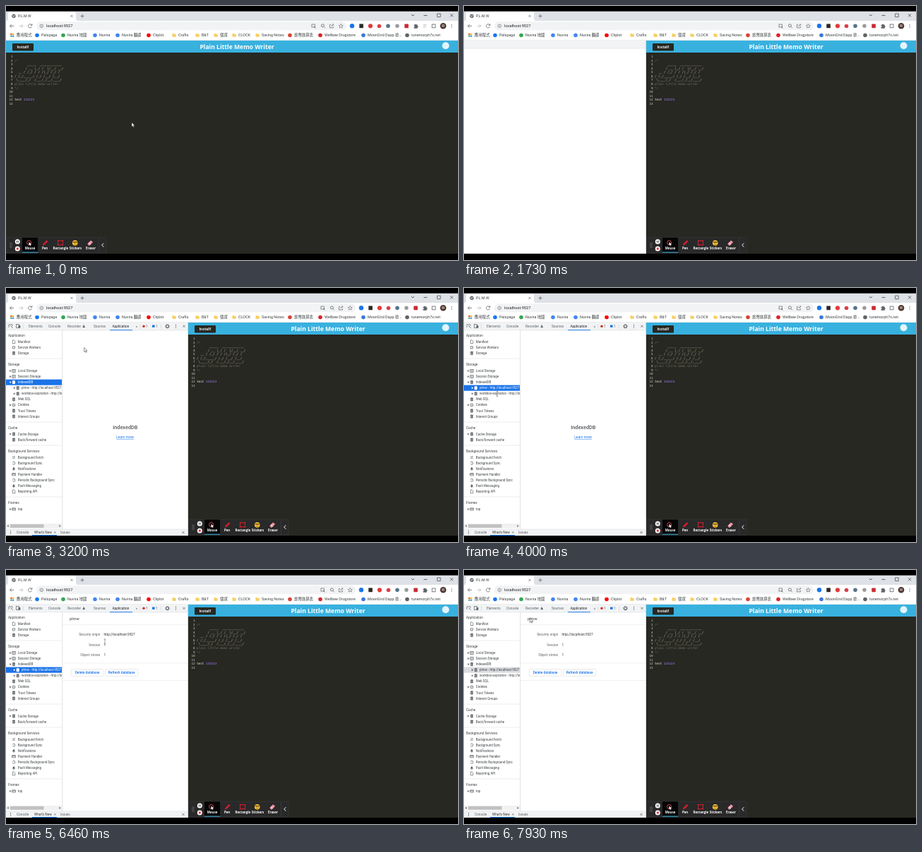
An HTML page for the animation above (8000 ms loop, 640 px wide and 360 px high).

```html
<!DOCTYPE html>
<html lang="en">
<head>
<meta charset="utf-8">
<title>Text editor and storage panel</title>
<style>
html, body { margin: 0; width: 100%; height: 100%; overflow: hidden; background: #000; }
svg { display: block; width: 100%; height: 100%; }
text { font-family: Roboto, "Noto Sans CJK TC", "Noto Sans CJK", sans-serif; white-space: pre; }
.code text { font-family: "DejaVu Sans Mono", monospace; font-size: 4.28px; }
.code .art { stroke: #75715e; stroke-width: .25px; }
.wide text, #title { font-family: "Open Sans", sans-serif; }
</style>
</head>
<body>
<svg id="stage" viewBox="0 0 640 360" preserveAspectRatio="none"></svg>
<script>
const LOOP = 8000, PANE = 258;
const INK = '#3c4043', GREY = '#5f6368', BLUE = '#1a73e8', RED = '#d5202f';

const rect = (x, y, w, h, fill, more = '') =>
  `<rect x="${x}" y="${y}" width="${w}" height="${h}" fill="${fill}" ${more}/>`;
const circle = (x, y, r, fill, more = '') =>
  `<circle cx="${x}" cy="${y}" r="${r}" fill="${fill}" ${more}/>`;
const line = (d, color = GREY, w = 0.8, more = '') =>
  `<path d="${d}" fill="none" stroke="${color}" stroke-width="${w}" ${more}/>`;
// y is the middle of the lower-case row
const text = (x, y, s, size = 5, fill = INK, more = '') =>
  `<text x="${x}" y="${y + size * 0.36}" font-size="${size}" fill="${fill}" ${more}>${s}</text>`;
const group = (id, body, more = '') => `<g id="${id}" ${more}>${body}</g>`;
const mid = 'text-anchor="middle"', end = 'text-anchor="end"', bold = 'font-weight="700"';
const cross = (x, y, r, c = GREY, w = 0.7) =>
  line(`M${x - r} ${y - r}l${2 * r} ${2 * r}m0 ${-2 * r}l${-2 * r} ${2 * r}`, c, w);
const dots = (x, y, c = GREY) => [-2, 0, 2].map(d => circle(x, y + d, 0.6, c)).join('');
const globe = (x, y) => circle(x, y, 2.7, GREY) +
  line(`M${x - 2} ${y - 1}q2 2 4 0M${x - 1} ${y + 2}q0 -2 2 -2`, '#fff', 0.6);

function browser() {
  const folder = x => `<path d="M${x - 2.5} 39h2l.8 .8h2.4v4h-5.2z" fill="#f6cf62"/>`;
  const marks = [
    [50, 'Palspage', '#1877f2'], [87, 'Nuvira 地圖', '#34a853'], [132, 'Nuvira', '#4285f4'],
    [164, 'Nuvira 翻譯', '#4285f4'], [208, 'Cliplot', '#f00'], [244, 'Crafts'], [277, 'B&amp;T'],
    [303, '個資'], [329, 'CLOCK'], [362, 'Saving Notes'], [408, '旅幣換算表', '#d64535'],
    [451, 'Wellbee Drugstore', '#d8232a'], [512, 'MoonGrid Dapp 排...', '#3a78d8'],
    [574, 'tunemorph7x.net', GREY]
  ];
  let apps = '';
  ['#ea4335', '#fbbc04', '#34a853', '#4285f4'].forEach((c, i) =>
    apps += rect(6.3 + i % 2 * 2.8, 38.8 + (i >> 1) * 2.8, 2.2, 2.2, c));
  return rect(0, 0, 640, 21, '#dee1e6') +
    '<path d="M0 21q3 0 3-3V11q0-3 3-3H96q3 0 3 3v7q0 3 3 3z" fill="#fff"/>' +
    globe(11, 14.3) + text(17, 14.5, 'P.L.M.W', 5.2) + cross(93, 14.3, 1.5) +
    line('M105.5 14.3h5M108 11.8v5') +
    line('M574 12l2 2 2-2M591.5 13.4h5', INK) +
    rect(610.7, 11, 4.4, 4.4, 'none', `stroke="${INK}" stroke-width=".7"`) + cross(631, 13.3, 2.1, INK) +
    rect(0, 21, 640, 28, '#fff') +
    line('M11 28.3H5.5M8 25.8l-2.5 2.5 2.5 2.5') +
    line('M18.5 28.3H24M21.5 25.8l2.5 2.5-2.5 2.5', '#b5b8bc') +
    line('M36.4 27a2.6 2.6 0 1 0 .1 2.4M36.9 25.2v2.1h-2.1') +
    `<rect id="pill" x="43" y="22.3" height="12" rx="6" fill="#f1f3f4"/>` +
    circle(50.3, 28.3, 2.3, 'none', `stroke="${GREY}" stroke-width=".6"`) +
    line('M50.3 28v1.6M50.3 26.8v.6', GREY, 0.6) +
    text(57, 28.2, 'localhost:9527', 5.7, '#202124') +
    group('tools', tools()) +
    group('list', line('M590.7 26.5h4.6M590.7 28.5h4.6M590.7 30.5h3', '#b9bcc0')) +
    rect(603.2, 26, 4.8, 4.8, 'none', `stroke="${GREY}" stroke-width=".8"`) +
    circle(619, 28.3, 4.3, '#4e342e') + text(619, 28.4, 'W', 5, '#fff', mid) + dots(631, 28.3) +
    apps + text(15, 41.5, '應用程式', 5.4) +
    marks.map(([x, s, c]) => (c ? circle(x - 6, 41.5, 2.8, c) : folder(x - 6)) +
      text(x, 41.5, s, 5.4)).join('') +
    rect(0, 48, 640, 0.7, '#e4e6e9');
}

function tools() {
  return rect(433, 26, 4.5, 4, 'none', `stroke="${GREY}" stroke-width=".7"`) + line('M436 29l2.4 2.4', GREY, 1) +
    circle(448.4, 27.8, 2, 'none', `stroke="${GREY}" stroke-width=".8"`) + line('M450 29.4l1.8 1.8') +
    line('M460 26.4h-1.6v4.5h5v-2M460.8 29q.2-2.6 3-2.6M462.6 25l1.4 1.4-1.4 1.4', GREY, 0.7) +
    line('M474.3 25.3l.9 2 2.1.2-1.6 1.4.5 2.1-1.9-1.1-1.9 1.1.5-2.1-1.6-1.4 2.1-.2z', GREY, 0.6) +
    circle(490, 28.3, 3.2, '#1976e8') + rect(500.3, 25.4, 5.6, 5.8, '#2b2926') +
    circle(516, 28.3, 3.1, '#e33a3a') + circle(528.5, 28.5, 2.8, '#db3f49') +
    circle(541, 28.3, 2.8, '#56748b') + circle(554, 28.3, 2.7, '#9a9a9a') +
    rect(564.3, 25.4, 5.6, 5.8, '#c92b34', 'rx=".8"') +
    '<path d="M577.6 26.6h1.6a1 1 0 0 1 2 0h1.5v1.6a1 1 0 0 1 0 2v1.5h-5.1v-1.6a1 1 0 0 0 0-2z" fill="#5f6368"/>';
}

function editor() {
  const art = [
    '       _____  ____________', '      / __ |_/ /  |/__/ __/', '  __ / /_/ / / /|_/ /_/ /',
    '/ /_/_____/ /_/ /__/ /__/', String.raw` \____/_/  /___/_/__/____/`
  ];
  const rows = ['', '/*', ...art, 'plain little memo writer', '*/', '', '', '', ''];
  const code = rows.map((s, i) => {
    const y = 71.4 + i * 5.58;
    return text(9.6, y, i + 1, 4.28, '#d0d0ca', end) +
      text(12, y, s, 4.28, '#75715e', art.includes(s) ? 'class="art"' : '');
  }).join('') +
    text(12, 71.4 + 11 * 5.58, 'test <tspan fill="#ae81ff">123123</tspan>', 4.28, '#f8f8f2');
  return rect(0, 66, 640, 294, '#272822') + rect(0, 48.7, 640, 17.3, '#38b1df') +
    rect(9, 53, 30, 10.5, '#272822', 'rx="1.2"') + text(24, 58.2, 'Install!', 5.7, '#fff', mid + ' font-weight="500"') +
    group('code', code, 'class="code"') + recorder();
}

function recorder() {
  const label = (x, s) => text(x, 343.8, s, 4.4, '#fff', mid + ' ' + bold);
  let grip = '';
  for (let i = 0; i < 8; i++) grip += circle(6 + i % 2 * 2, 336 + (i >> 1) * 2, 0.5, '#aaa');
  const labels = label(34, 'Mouse') + label(55, 'Pen') + label(77.3, 'Rectangle') +
    label(98.5, 'Stickers') + label(120, 'Eraser');
  return rect(0, 328, 142, 22, '#292929', 'stroke="#3b3b3b" stroke-width=".6"') + grip +
    circle(16.3, 334, 3.5, '#fff') + line('M15.3 332.5v3M17.3 332.5v3', '#222', 0.9) +
    circle(16.3, 344, 3.5, '#fff') + rect(14.8, 342.5, 3, 3, '#e53945') +
    rect(23, 328.3, 22, 21.4, '#050505') + rect(23, 348.6, 22, 1.1, '#3bb0dc') +
    circle(32.6, 335.4, 3, 'none', 'stroke="#e5525c" stroke-width=".9"') +
    '<path d="M32.5 334.5v5l1.2-1.1 1 1.7.8-.5-1-1.6h1.6z" fill="#fff"/>' +
    line('M52.3 339.2l1.2-2.8 4.3-4 1.2 1.2-4.2 4.3z', RED, 1) + line('M53.3 338l5-5', RED, 1.6) +
    rect(73.6, 332.6, 6.8, 6, 'none', `stroke="${RED}" stroke-width="1"`) +
    [[73.6, 332.6], [80.4, 332.6], [73.6, 338.6], [80.4, 338.6]].map(p => circle(...p, 0.9, RED)).join('') +
    circle(97.7, 335.7, 3.8, '#fbc537') + rect(94.8, 334, 5.8, 1.3, '#4c3b20') + line('M96 337q1.8 1.6 3.5 0', '#7a4a14', 0.7) +
    '<path d="M115.3 337l4.8-4.8 3 2.6-4.8 4.8h-1.2z" fill="#f495a5"/>' + line('M117 335.4l3 2.7', '#fff', 0.8) +
    group('labels', labels, 'class="wide"') +
    line('M131.5 328.5v21', '#444', 0.5) + line('M138.3 336.2l-2.6 2.7 2.6 2.7', '#fff', 1);
}

function devtools() {
  const tabs = [[32, 'Elements'], [60, 'Console'], [87, 'Recorder'], [124, 'Sources']];
  const tab = ([x, s]) => text(x, 54.2, s, 4.75, GREY);
  const strip = tabs.map(tab).join('') +
    '<path d="M109.5 52.6h1.4v1.2l1.3 2.3h-4l1.3-2.3z" fill="#5f6368"/>' +
    line('M4 55.8V51.8h5v2', GREY, 0.7) + line('M6.5 53.5l3.2 3.2', GREY, 0.9) +
    rect(14.5, 51.5, 4, 5, 'none', `stroke="${GREY}" stroke-width=".7"`) + rect(17.5, 53, 2.8, 3.8, GREY) +
    line('M24.5 51v6.5', '#cacdd1', 0.5) +
    circle(228.5, 54.2, 2, 'none', `stroke="${GREY}" stroke-width="1.1"`) +
    circle(228.5, 54.2, 2.8, 'none', `stroke="${GREY}" stroke-width=".7" stroke-dasharray="1.1 1.1"`) +
    dots(240.5, 54.2) + cross(252, 54.2, 1.6);
  const drawer = rect(0, 342, PANE, 9, '#f1f3f4') + line(`M0 342h${PANE}`, '#d4d6da', 0.5) +
    dots(6.5, 346.4) + text(15, 346.4, 'Console', 4.75, GREY) + text(40, 346.4, "What's New", 4.75, '#333') +
    cross(69.3, 346.4, 1.2) + text(77, 346.4, 'Issues', 4.75, GREY) +
    rect(37, 350, 35, 1, BLUE) + cross(251, 346.4, 1.6);
  return rect(0, 48.7, PANE, 312, '#fff') +
    rect(0, 48.7, PANE, 11.3, '#f1f3f4') + line(`M0 60h${PANE}`, '#d4d6da', 0.5) +
    group('strip', strip) +
    group('oldTabs', tab([150, 'Network']) + tab([178, 'Performance']) + rect(237, 59, 20.5, 1, BLUE)) +
    group('app', appTab() + sidebar() + emptyView() + dbView()) +
    group('drawer', drawer) + rect(PANE - 0.7, 49, 0.7, 311, '#cfd2d6');
}

function appTab() {
  return text(150.5, 54.2, 'Application', 4.75, '#202124') + rect(147, 59.2, 32, 0.9, BLUE) +
    text(185, 54, '»', 6, GREY, mid) + line('M190 51.5v6M219.5 51.5v6', '#cacdd1', 0.5) +
    circle(195, 54.2, 1.8, '#d93025') + text(198, 54.2, '1', 4.7, GREY) +
    rect(207, 52.5, 3.6, 3.2, BLUE, 'rx=".5"') + text(212, 54.2, '1', 4.7, GREY);
}

const arrow = (x, y, open) =>
  `<path d="${open ? `M${x - 1.6} ${y - 0.9}h3.2l-1.6 2.3z` : `M${x - 1} ${y - 1.6}v3.2l2.2-1.6z`}" fill="${GREY}"/>`;
const icons = {
  db: (x, y) => `<path d="M${x - 2} ${y - 2}q2-1.2 4 0v4q-2 1.2-4 0z" fill="${GREY}"/>` +
    line(`M${x - 2} ${y - 0.8}q2 1 4 0m-4 1.6q2 1 4 0`, '#fff', 0.4),
  page: (x, y) => line(`M${x - 1.7} ${y - 2.3}h2.2l1.3 1.3v3.4h-3.5z`, GREY, 0.7),
  gear: (x, y) => circle(x, y, 1.7, 'none', `stroke="${GREY}" stroke-width="1.2" stroke-dasharray="1.1 .5"`),
  grid: (x, y) => rect(x - 2.2, y - 1.9, 4.4, 3.8, 'none', `stroke="${GREY}" stroke-width=".7"`) +
    line(`M${x - 2} ${y - 0.5}h4M${x} ${y - 0.5}v2.3`, GREY, 0.6),
  swap: (x, y) => line(`M${x - 2} ${y - 1}h3.6m-1-1l1 1M${x + 2} ${y + 1}h-3.6m1 1l-1-1`, GREY, 0.7),
  sync: (x, y) => circle(x, y, 1.9, 'none', `stroke="${GREY}" stroke-width=".8" stroke-dasharray="4.5 1.5"`),
  bell: (x, y) => `<path d="M${x - 2} ${y + 1.4}l.6-1v-1q1.4-3 2.8 0v1l.6 1z" fill="${GREY}"/>` + circle(x, y + 1.9, 0.6, GREY),
  card: (x, y) => rect(x - 2.3, y - 1.6, 4.6, 3.2, 'none', `stroke="${GREY}" stroke-width=".7"`) + rect(x - 2.2, y - 0.9, 4.4, 0.9, GREY),
  cookie: (x, y) => circle(x, y, 2, 'none', `stroke="${GREY}" stroke-width=".8"`) + circle(x, y, 0.6, GREY)
};

function row(name, y, icon, { depth = 0, fold = '' } = {}) {
  const x = 11 + depth * 5.7;
  return (fold ? arrow(x - 4.8, y, fold === 'open') : '') + icons[icon](x, y) +
    text(x + 5.8 - depth * 0.5, y, name, 4.5);
}

function sidebar() {
  const shut = { fold: 'shut' }, child = { fold: 'shut', depth: 1 };
  const sections = [
    ['Application', 67, 76.2, [['Manifest', 'page'], ['Service Workers', 'gear'], ['Storage', 'db']]],
    ['Storage', 108, 117.5, [['Local Storage', 'grid', shut], ['Session Storage', 'grid', shut],
      ['IndexedDB', 'db', { fold: 'open' }], ['plmw - http://localhost:9527', 'db', child],
      ['workbox-expiration - http://localhost:9527', 'db', child], ['Web SQL', 'db'], ['Cookies', 'cookie', shut],
      ['Trust Tokens', 'db'], ['Interest Groups', 'db']]],
    ['Cache', 198, 207, [['Cache Storage', 'db', shut], ['Back/forward cache', 'db']]],
    ['Background Services', 231, 240.1, [['Background Fetch', 'swap'], ['Background Sync', 'sync'],
      ['Notifications', 'bell'], ['Payment Handler', 'card'], ['Periodic Background Sync', 'sync'],
      ['Push Messaging', 'bell'], ['Reporting API', 'page']]],
    ['Frames', 304, 313.5, [['top', 'card', shut]]]
  ];
  let out = rect(0, 60.3, 79.5, 281, '#fff') + `<rect id="pick" x="0" width="79.5" height="8.1"/>`;
  for (const [head, y, first, rows] of sections) {
    if (y > 70) out += line(`M0 ${y - 8}h79.5`, '#d8dadd', 0.5);
    out += text(3, y, head, 4.75);
    rows.forEach(([name, icon, opt], i) => {
      const id = name === 'IndexedDB' ? 'rowIdb' : name.startsWith('plmw') ? 'rowDb' : '';
      const body = row(name, first + i * 8.06, icon, opt);
      out += id ? group(id, body) : body;
    });
  }
  out += rect(0, 334, 79.5, 6.5, '#f1f1f1') + rect(6, 334.8, 47.5, 5, '#c1c1c1') +
    '<path d="M3.6 335.5v3.6l-2-1.8zM75.5 335.5v3.6l2-1.8z" fill="#666"/>';
  return `<clipPath id="side"><rect x="0" y="60" width="79" height="282"/></clipPath>` +
    `<g clip-path="url(#side)">${out}</g>` + line('M79.7 60v282', '#cacdd1', 0.6);
}

function emptyView() {
  return group('emptyView', text(168.8, 197, 'IndexedDB', 7.3, '#55585c', mid + ' font-weight="500"') +
    text(168.6, 211.2, 'Learn more', 4.9, BLUE, mid + ' text-decoration="underline"'));
}

function dbView() {
  const pairs = [['Security origin', 'http://localhost:9527'], ['Version', '1'], ['Object stores', '1']];
  const button = (x, w, s) => rect(x, 140.6, w, 9.8, '#fff', 'rx="1.2" stroke="#dadce0" stroke-width=".6"') +
    text(x + w / 2, 145.5, s, 4.8, BLUE, mid + ' font-weight="500"');
  return group('dbView', text(90, 69, 'plmw', 5.7) + line('M80 77.4h177M80 132h177M80 156.5h177', '#dfe1e4', 0.5) +
    pairs.map(([k, v], i) => text(133.3, 91.4 + i * 14.4, k, 4.75, GREY, end) +
      text(138.5, 91.4 + i * 14.4, v, 4.75, '#303134')).join('') +
    button(92.3, 45.6, 'Delete database') + button(140.5, 46.4, 'Refresh database'));
}

const pointer = group('pointer',
  group('hand', '<path d="M0 -2v6.2l1.4-1.3 1 2.1 1-.5-1-2h2z" fill="#fff" stroke="#222" stroke-width=".5"/>') +
  group('beam', line('M-1.2 -3.5h2.4M0 -3.5v7M-1.2 3.5h2.4', '#777', 0.7)));

const letterbox = rect(0, 0, 640, 7.6, '#000') + rect(0, 351, 640, 9, '#000');

document.getElementById('stage').innerHTML =
  group('page', editor()) +
  text(0, 57.8, 'Plain Little Memo Writer', 8.6, '#fff', `id="title" ${mid} ${bold}`) +
  circle(622.5, 56.3, 5, '#e4f4fb') +
  group('devtools', devtools()) + browser() + pointer + letterbox;

const $ = id => document.getElementById(id);
const show = (id, on) => { $(id).style.display = on ? '' : 'none'; };
const within = (t, a, b) => t >= a && t < b;

// time, x, y
const path = [
  [60, 178, 167], [400, 41, 132.5], [2400, 41, 132.5], [2660, 163, 56], [2860, 163, 56],
  [3660, 29, 134], [3730, 29, 134], [4000, 47, 150], [4330, 47, 150], [4730, 33, 135],
  [5330, 33, 135], [5460, 32.5, 140], [5930, 36, 142], [6200, 36, 142], [6460, 140, 101.5],
  [6600, 140, 101.5], [7400, 93.3, 70]
];

function pointerAt(t) {
  const i = path.findIndex(p => p[0] > t);
  if (i === 0) return path[0].slice(1);
  if (i < 0) return path[path.length - 1].slice(1);
  const [t0, x0, y0] = path[i - 1], [t1, x1, y1] = path[i];
  const k = (t - t0) / (t1 - t0), e = k * k * (3 - 2 * k);
  return [x0 + (x1 - x0) * e, y0 + (y1 - y0) * e];
}

function draw(t) {
  const open = t >= 1730, app = t >= 2460;
  const dbPicked = within(t, 3940, 4600) || t >= 5930;
  const dbShown = within(t, 4060, 4600) || t >= 5930;
  const faded = t >= 7200;

  $('page').setAttribute('transform', `translate(${open ? PANE : 0})`);
  $('title').setAttribute('x', open ? 456 : 327);
  $('pill').setAttribute('width', open ? 452 : 439);
  $('tools').setAttribute('transform', `translate(${open ? 13 : 0})`);
  show('list', !open);
  show('devtools', open);
  show('strip', t >= 1800);
  show('oldTabs', t >= 1800 && !app);
  show('drawer', t >= 1930);
  show('app', app);
  show('emptyView', !dbShown);
  show('dbView', dbShown);

  $('pick').setAttribute('y', dbPicked ? 137.6 : 129.6);
  $('pick').setAttribute('fill', faded ? '#dadce0' : BLUE);
  const invert = on => on && !faded ? 'brightness(0) invert(1)' : '';
  $('rowDb').style.filter = invert(dbPicked);
  $('rowIdb').style.filter = invert(!dbPicked);

  const beam = within(t, 3900, 4330) || within(t, 6400, 6900);
  show('pointer', !within(t, 400, 2400));
  show('beam', beam);
  show('hand', !beam);
  $('pointer').setAttribute('transform', `translate(${pointerAt(t)})`);
}

const start = performance.now();
function tick() {
  draw((performance.now() - start) % LOOP);
  requestAnimationFrame(tick);
}
tick();
</script>
</body>
</html>
```
